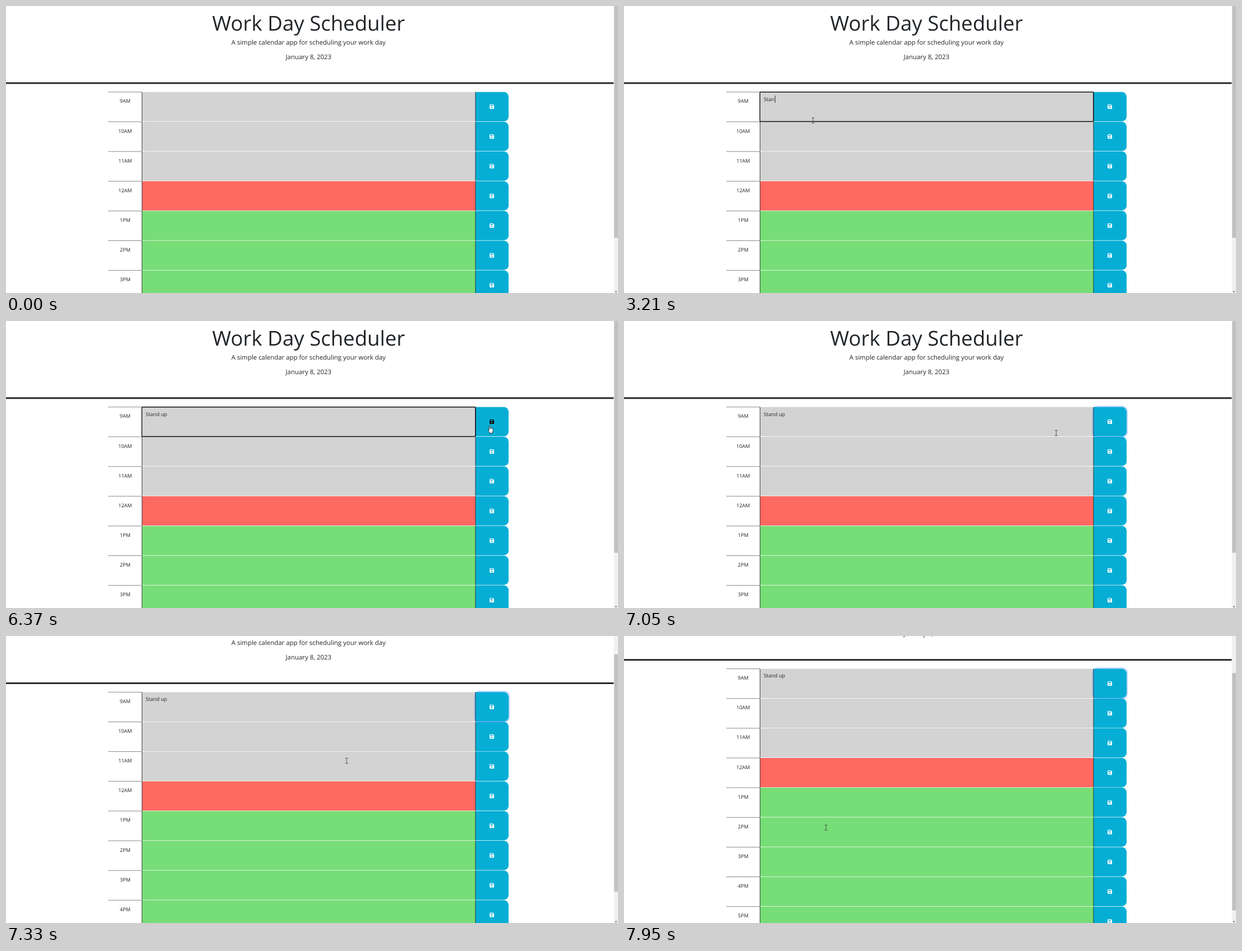
Write an HTML page that moves like this. It is 1091x513 px and loops after 8 s.

```html
<!DOCTYPE html>
<html lang="en">
<head>
<meta charset="utf-8">
<title>Work Day Scheduler</title>
<style>
  html, body { margin: 0; width: 100%; height: 100%; overflow: hidden; background: #fff; }
  svg { display: block; width: 1091px; height: 513px; }
  text {
    font-family: "Open Sans", "Noto Sans", sans-serif;
    font-size: 9.12px;
    fill: #212529;
    text-rendering: geometricPrecision;
    white-space: pre;
  }
  .mid { text-anchor: middle; }
  .title { font-size: 36.6px; }
  .lead { font-size: 11.41px; }
  .past { fill: #d3d3d3; }
  .present { fill: #ff6961; }
  .future { fill: #77dd77; }
  .save { fill: #06aed5; }
  .edge { fill: #222; }
  .dash { stroke: #222; stroke-width: .9; stroke-dasharray: 1.7 1.15; }
  .icon { fill: #fff; fill-rule: evenodd; }
  .icon.hover { fill: #000; }
</style>
</head>
<body>
<svg viewBox="0 0 1091 513">
  <g id="page">
    <text class="mid title" x="539.3" y="43.9">Work Day Scheduler</text>
    <text class="mid lead" x="539.3" y="69.1">A simple calendar app for scheduling your work day</text>
    <text class="mid lead" x="539.3" y="95.3">January 8, 2023</text>
    <rect y="136.4" width="1083.5" height="2.9" fill="#212529"/>
    <g id="rows"></g>
    <text id="note" x="249.1" y="169.7"></text>
    <rect id="caret" y="160.2" width=".9" height="12.4" fill="#222"/>
    <rect id="fieldRing" x="242.3" y="153.7" width="594.6" height="52.8" rx="1.5"
      fill="none" stroke="#111" stroke-width="1.4"/>
    <rect id="saveRing" x="835.8" y="152.6" width="61.2" height="54.6" rx="9"
      fill="none" stroke="#0d6efd" stroke-opacity=".28" stroke-width="2.3"/>
  </g>
  <rect x="1083.5" width="7.5" height="513" fill="#f1f1f1"/>
  <rect id="thumb" x="1084.2" width="6.8" height="424.3" fill="#c1c1c1"/>
  <path d="M1085.4 509.8h4l-2 2.2Z" fill="#505050"/>
  <g id="pointer">
    <path data-kind="arrow" d="M0 0V10L2.3 8L3.8 11.4L5.3 10.7L3.9 7.5H7Z"
      fill="#fff" stroke="#000" stroke-width=".6"/>
    <path data-kind="beam" d="M-2.6-4.6H2.6M0-4.6V4.6M-2.6 4.6H2.6"
      fill="none" stroke="#444" stroke-width=".85"/>
    <path data-kind="hand" d="M-1 7.6V.5a1 1 0 0 1 2 0V4.2q3-.6 4.9 1.3V9L5 11.500V13H0V11.700L-3 8q-.6-2 2-.4Z"
      fill="#fff" stroke="#000" stroke-width=".75"/>
  </g>
</svg>
<script>
const LOOP = 8000, TICK = 69, TOP = 153.5, PITCH = 53.13;
const FOCUS = 1283, SAVE = 6630, BLINK = 520, KEY_GAP = 112;
const HOURS = ["9AM", "10AM", "11AM", "12AM", "1PM", "2PM", "3PM", "4PM", "5PM"];

// Bursts of typing.
const BURSTS = [
  { at: 2620, text: "S" },
  { at: 2880, text: "tand" },
  { at: 4010, text: " " },
  { at: 4400, text: "up" }
];

// The pointer enters from outside the stage; sag bends a leg downwards.
const ENTRY = { x: 1201, y: 537 };
const LEGS = [
  { from: 70, to: 610, x: 353, y: 186 },
  { from: 810, to: 880, x: 341.5, y: 193 },
  { from: 1220, to: 1410, x: 337, y: 204.5 },
  { from: 5060, to: 5260, x: 336.5, y: 216 },
  { from: 5470, to: 6370, x: 862.3, y: 187.6, sag: 22 },
  { from: 6990, to: 7260, x: 607.3, y: 223 },
  { from: 7535, to: 7950, x: 360, y: 342.5, sag: -36 }
];

const $ = id => document.getElementById(id);
const show = (el, on) => el.setAttribute("visibility", on ? "visible" : "hidden");
const clamp = v => Math.min(1, Math.max(0, v));
const easeOut = p => p * (2 - p);
const smooth = p => p * p * (3 - 2 * p);

function rowMarkup(hour, i) {
  const kind = i < 3 ? "past" : i === 3 ? "present" : "future";
  return `<g transform="translate(0 ${TOP + i * PITCH})">
    <path class="dash" d="M183 .3H242.5"/>
    <text class="mid" x="212.4" y="19.9">${hour}</text>
    <rect class="${kind}" x="242.5" y=".3" width="594.5" height="52.4"/>
    <path class="save" d="M837 .3h50.500a8.500 8.500 0 0 1 8.500 8.500v35.400a8.500 8.500 0 0 1-8.500 8.500h-50.500Z"/>
    <rect class="edge" x="242" y=".3" width=".85" height="52.4"/>
    <rect class="edge" x="836.5" y=".3" width=".85" height="52.4"/>
    <path class="icon" transform="translate(862.1 22.6)" d="M1 0H6L8 2V7a1 1 0 0 1-1 1H1a1 1 0 0 1-1-1V1a1 1 0 0 1 1-1ZM1.200 1.200V3H5.700V1.200ZM4 4.200a1.150 1.150 0 1 0 .01 0Z"/>
  </g>`;
}

$("rows").innerHTML = HOURS.map(rowMarkup).join("");
const icons = [...document.querySelectorAll(".icon")];
const shapes = [...$("pointer").children];

// Walks the legs in equal hard steps; the first step already moves.
function pointerAt(t) {
  let pos = ENTRY;
  for (const { from, to, x, y, sag = 0 } of LEGS) {
    if (t < from) break;
    const gaps = Math.round((to - from) / TICK);
    const step = 1 + Math.floor((t - from) * gaps / (to - from) + 1e-6);
    const p = easeOut(clamp(step / (gaps + 1)));
    pos = {
      x: pos.x + (x - pos.x) * p,
      y: pos.y + (y - pos.y) * p + sag * Math.sin(Math.PI * p)
    };
  }
  return pos;
}

function scrollAt(t) {
  const start = 7260, tick = 70;
  const held = start + Math.floor((t - start) / tick) * tick;
  return 95.2 * smooth(clamp((held - start + 29) / 183));
}

function drawPointer(t, scroll) {
  const { x, y } = pointerAt(t);
  const row = Math.floor((y + scroll - TOP) / PITCH);
  const inRow = row >= 0 && row < HOURS.length;
  const onSave = inRow && x >= 837 && x < 896;
  const onField = inRow && x > 242 && x < 837;
  const kind = onSave ? "hand" : onField ? "beam" : "arrow";
  $("pointer").setAttribute("transform", `translate(${x} ${y})`);
  shapes.forEach(s => show(s, s.dataset.kind === kind));
  icons.forEach((icon, i) => icon.classList.toggle("hover", onSave && i === row));
}

function drawNote(t) {
  let text = "", lastInput = FOCUS + 17;
  for (const burst of BURSTS) {
    [...burst.text].forEach((char, i) => {
      const at = burst.at + i * KEY_GAP;
      if (t >= at) { text += char; lastInput = at; }
    });
  }
  const note = $("note");
  if (note.textContent !== text) note.textContent = text;
  const focused = t >= FOCUS && t < SAVE;
  const lit = t < lastInput || Math.floor((t - lastInput) / BLINK) % 2 === 0;
  $("caret").setAttribute("x", 250.05 + (text && note.getComputedTextLength()));
  show($("caret"), focused && lit);
  show($("fieldRing"), focused);
  show($("saveRing"), t >= SAVE);
}

function draw() {
  const t = performance.now() % LOOP;
  const scroll = scrollAt(t);
  $("page").setAttribute("transform", `translate(0 ${-scroll})`);
  $("thumb").setAttribute("y", -10 + scroll * .8);
  drawNote(t);
  drawPointer(t, scroll);
  requestAnimationFrame(draw);
}
draw();
</script>
</body>
</html>
```
